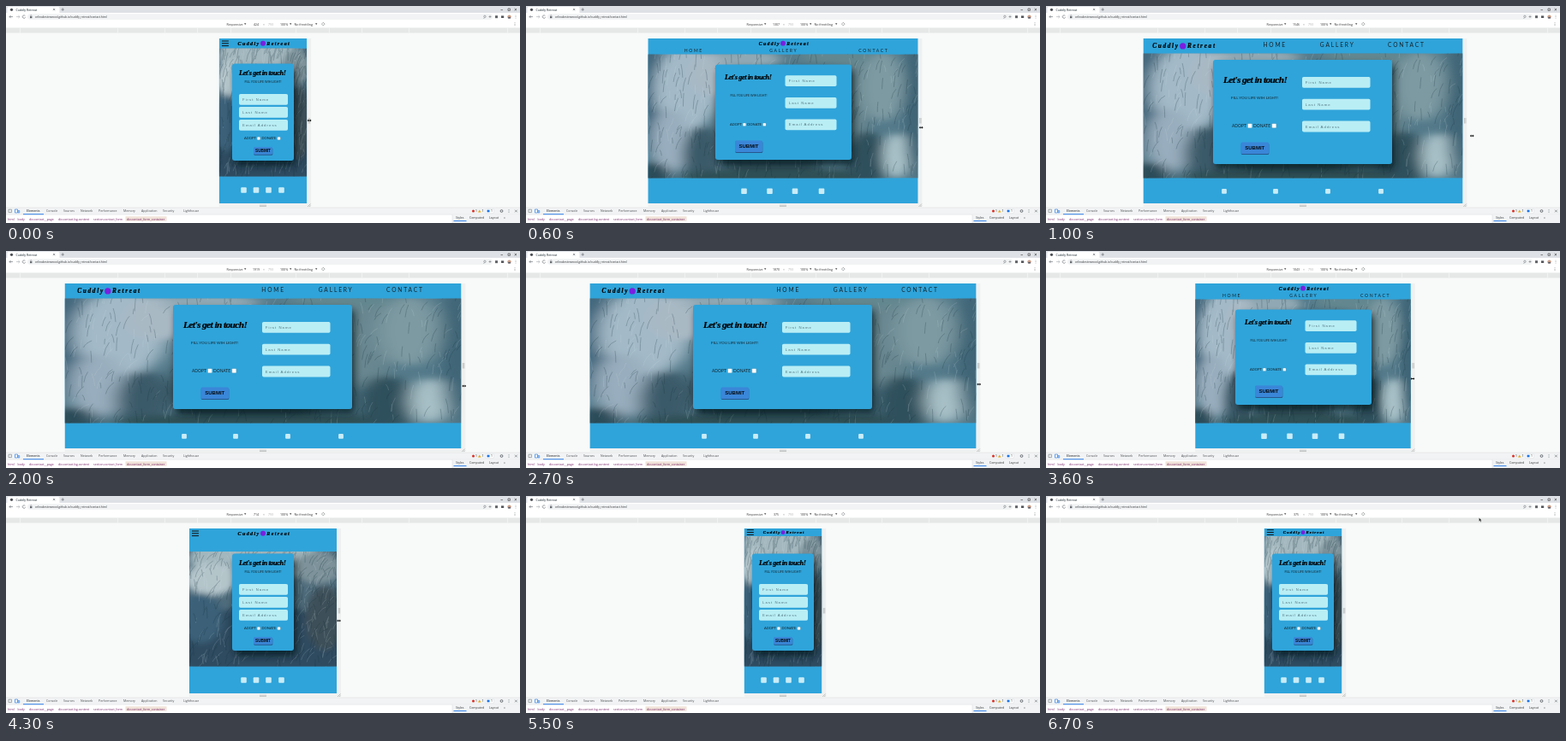
An HTML page for the animation above (7.4 s loop, 600x254 px).

```html
<!DOCTYPE html>
<html lang="en">
<head>
<meta charset="utf-8">
<title>Responsive contact page</title>
<style>
  html, body { margin: 0; width: 100%; height: 100%; overflow: hidden; background: #f8f9f9; }
  svg { display: block; }
  #stage { width: 100%; height: 100%; }
  text { white-space: pre; }
  .ui { font-family: "Open Sans", "Noto Sans", sans-serif; }
  .lato { font-family: Lato, sans-serif; }
  .arial { font-family: "Liberation Sans", Arial, sans-serif; }
  .script { font-family: "Liberation Serif", serif; font-weight: bold; font-style: italic; stroke: #000; stroke-width: .22px; }
  .fur path { vector-effect: non-scaling-stroke; }
</style>
</head>
<body>
<svg id="stage" viewBox="0 0 600 254">
  <defs>
    <filter id="soft" x="-20%" y="-20%" width="140%" height="140%"><feGaussianBlur stdDeviation="2.4"/></filter>
    <filter id="shade" x="-30%" y="-30%" width="160%" height="160%"><feGaussianBlur stdDeviation="4.5"/></filter>
  </defs>
  <g id="browser"></g>
  <g id="page"></g>
  <g id="pointer"></g>
</svg>
<script>
const LOOP = 7400, STEP = 100, SCALE = 0.241, MIDDLE = 300;
const TOP = 38, BOTTOM = 231;
const BLUE = '#2fa4da', INK = '#15232b';

// [ms, viewport width in CSS pixels]
const WIDTHS = [[0, 424], [100, 475], [400, 1010], [700, 1455], [800, 1525], [1000, 1546], [1500, 1919],
  [2000, 1919], [2200, 1958], [2500, 1958], [2700, 1870], [3100, 1369], [3300, 1236], [4100, 722],
  [4300, 714], [4400, 665], [4900, 378], [5000, 375]];
// [ms, distance from the right edge of the page, y]
const DRAG = [[0, 3, 134], [800, 4, 145], [1000, 11, 152], [1500, 3, 158], [2500, 4, 158],
  [3100, 2, 152], [4300, 2.5, 146], [5000, 3, 140]];
const LEAVE = [[4900, 348, 140], [5400, 541, 11]];
const RETURN = [[6500, 506.5, 17], [6700, 505.5, 25.5]];

function sample(keys, t, col = 1) {
  if (t <= keys[0][0]) return keys[0][col];
  const i = keys.findIndex(k => k[0] >= t);
  if (i < 0) return keys[keys.length - 1][col];
  const a = keys[i - 1], b = keys[i];
  return a[col] + (b[col] - a[col]) * (t - a[0]) / (b[0] - a[0]);
}

const rect = (x, y, w, h, fill, extra = '') =>
  `<rect x="${x}" y="${y}" width="${w}" height="${h}" fill="${fill}" ${extra}/>`;
const dot = (x, y, r, fill) => `<circle cx="${x}" cy="${y}" r="${r}" fill="${fill}"/>`;
const line = (d, color = '#5f6368', w = .6) =>
  `<path d="${d}" fill="none" stroke="${color}" stroke-width="${w}"/>`;
const text = (s, x, y, size, { cls = 'ui', fill = INK, anchor = 'start', gap = 0, bold = false } = {}) =>
  `<text class="${cls}" x="${x}" y="${y}" font-size="${size}" fill="${fill}" text-anchor="${anchor}"` +
  ` letter-spacing="${gap}"${bold ? ' font-weight="700"' : ''}>${s}</text>`;

function randomizer(seed) {
  return () => (seed = (seed * 16807) % 2147483647) / 2147483647;
}

// Soft colour fields with fine fur, in a 100 x 100 space; lean is the sideways reach of a hair
function photo(base, blobs, lean, seed) {
  const rnd = randomizer(seed);
  const fields = blobs.map(([x, y, rx, ry, c]) =>
    `<ellipse cx="${x}" cy="${y}" rx="${rx}" ry="${ry}" fill="${c}"/>`).join('');
  let light = '', dark = '';
  for (let i = 0; i < 420; i++) {
    const x = rnd() * 100, y = rnd() * 105, dx = (rnd() - .25) * lean, dy = -4 - rnd() * 8;
    const hair = `M${x.toFixed(1)} ${y.toFixed(1)}q${(dx * .2).toFixed(1)} ${(dy * .6).toFixed(1)} ${dx.toFixed(1)} ${dy.toFixed(1)}`;
    if (rnd() < .45) light += hair; else dark += hair;
  }
  return rect(0, 0, 100, 100, base) + `<g filter="url(#soft)">${fields}</g>` +
    `<g class="fur" opacity=".24">${line(light, '#d5e6ec', .7)}${line(dark, '#16323d', 1)}</g>`;
}

const WIDE_PHOTO = photo('#547a8a', [
  [1, 35, 5, 45, '#41657a'], [14, 28, 12, 34, '#a3b9c7'], [8, 70, 7, 26, '#98adbd'],
  [24, 16, 9, 18, '#a9b9c4'], [37, 4, 12, 8, '#90a8b3'], [20, 82, 7, 24, '#3b5a69'],
  [46, 72, 19, 36, '#31505a'], [50, 99, 38, 7, '#2f4f55'], [2, 97, 6, 10, '#2c4c58'],
  [76, 35, 7, 38, '#67868f'], [87, 26, 8, 28, '#7d9aa2'], [81, 84, 7, 22, '#2f505b'],
  [92, 82, 5, 18, '#a9c1c8'], [99, 40, 4, 60, '#3d6475'], [70, 2, 14, 6, '#64878f']], 3, 41);
const TALL_PHOTO = photo('#4f6c7c', [
  [45, 6, 45, 20, '#a3b7be'], [15, 24, 18, 14, '#b4c5ca'], [87, 14, 16, 14, '#7d929a'],
  [50, 82, 62, 34, '#2f4c61'], [8, 58, 14, 22, '#3a6178'], [92, 58, 13, 28, '#3d4f58']], 8, 97);

const LAYOUTS = {
  wide: {
    card: [195, 63, 209, 122], title: [207, 90.2, 11.3], motto: [243.5, 109.3, 4.55],
    check: [217, 142.4, 4.9, 235.5, 242, 263.8, 5], submit: [227.5, 159.5, 32.5, 13.5, 6],
    fields: [299, 79.5, 12.8, [83, 108.8, 134.6], 302.8], icons: [208, 268, 329, 391], icon: 5.8
  },
  medium: {
    card: [221, 68.5, 159, 111.5], title: [232, 86, 8.3], motto: [260, 106, 3.55],
    check: [238, 140.3, 4.05, 253.2, 258.3, 276.6, 3.5], submit: [244, 157.5, 32, 13.5, 6],
    fields: [302.5, 60, 12.8, [81.3, 106.9, 132.5], 306.8], icons: [254.5, 284.5, 314, 345], icon: 6.6
  },
  narrow: {
    card: [264, 67.5, 72, 113.5], title: [272, 81, 8.3], motto: [300, 90.3, 3.55],
    check: [278, 156.4, 4.05, 293.2, 298.5, 316.8, 3.5], submit: [289, 165, 22, 8.8, 4.7],
    fields: [272, 57, 12.8, [103, 118, 133], 276], icons: [277.5, 292, 306.5, 321.5], icon: 6.6
  }
};

function logo(x, y, size) {
  const style = { cls: 'script', gap: size * .235, fill: '#000' };
  return text('Cuddly', x - size * .55, y, size, { ...style, anchor: 'end' }) +
    dot(x, y - size * .33, size * .5, '#7a1fe0') +
    text('Retreat', x + size * .72, y, size, style);
}

function form(l) {
  const [cx, cy, cw, ch] = l.card, [sx, sy, sw, sh, ss] = l.submit;
  const [fx, fw, fh, rows, labelX] = l.fields;
  const [ax, ay, as, box1, dx, box2, box] = l.check;
  const tick = x => rect(x, ay - box + .3, box, box, '#fff', 'rx=".7" stroke="#6b8791" stroke-width=".3"');
  const labels = ['First Name', 'Last Name', 'Email Address'];
  return rect(cx + 3, cy + 6, cw, ch, '#06141c', 'rx="4" filter="url(#shade)" opacity=".75"') +
    rect(cx, cy, cw, ch, BLUE, 'rx="3"') +
    text("Let's get in touch!", l.title[0], l.title[1], l.title[2],
      { cls: 'script', gap: -.05 * l.title[2], fill: '#000' }) +
    text('FILL YOU LIFE WIH LIGHT!', ...l.motto, { cls: 'lato', anchor: 'middle' }) +
    rows.map((y, i) => rect(fx, y, fw, fh, '#b9eef5', 'rx="1.8"') +
      text(labels[i], labelX, y + 7.9, 4.3, { cls: 'arial', gap: 1.02, fill: '#52747f' })).join('') +
    text('ADOPT', ax, ay, as, { cls: 'lato' }) + tick(box1) +
    text('DONATE', dx, ay, as, { cls: 'lato' }) + tick(box2) +
    rect(sx + .3, sy + 1, sw, sh, '#27588f', 'rx="1.5"') +
    rect(sx, sy, sw, sh, '#3a86d8', 'rx="1.5"') +
    text('SUBMIT', sx + sw / 2, sy + sh / 2 + ss * .36, ss, { cls: 'arial', anchor: 'middle', bold: true, fill: '#060c14' });
}

function header(mode, left, right, width) {
  const nav = (s, x, y, size, gap) =>
    text(s, x + gap / 2, y, size, { cls: 'lato', anchor: 'middle', gap });
  if (mode === 'wide') {
    const inset = 46 + (width - 372.5) * .045;
    return logo(left + inset, 49.3, 7.25) + nav('HOME', right - 220, 48.4, 6.6, 1.85) +
      nav('GALLERY', right - 147, 48.4, 6.6, 1.85) + nav('CONTACT', right - 66.3, 48.4, 6.6, 1.85);
  }
  if (mode === 'medium') {
    return logo(MIDDLE, 45.6, 5.75) + ['HOME', 'GALLERY', 'CONTACT']
      .map((s, i) => nav(s, left + width * (2 * i + 1) / 6, 54, 5.1, 1.65)).join('');
  }
  const small = width < 96, y = small ? 39.7 : 41;
  return [0, 2.8, 5.6].map(d => rect(left + 3, y + d - .5, 8, 1, '#111')).join('') +
    logo(MIDDLE, small ? 44.3 : 45.8, small ? 4.75 : 6);
}

function page(cssWidth) {
  const mode = cssWidth > 1400 ? 'wide' : cssWidth > 768 ? 'medium' : 'narrow';
  const l = LAYOUTS[mode], tall = mode === 'narrow';
  const width = cssWidth * SCALE, left = MIDDLE - width / 2, right = MIDDLE + width / 2;
  const photoTop = tall ? 47 + Math.max(0, width - 90.4) * .22 : mode === 'wide' ? 55.5 : 56.5;
  const photoEnd = tall ? 199.5 : 201.5;
  const grip = right + 2.9;
  return rect(left, TOP, width + 5, BOTTOM - TOP + 5, '#eff1f1') +
    rect(left, TOP, width, BOTTOM - TOP, BLUE) +
    `<svg x="${left}" y="${photoTop}" width="${width}" height="${photoEnd - photoTop}" viewBox="0 0 100 100" preserveAspectRatio="none">${tall ? TALL_PHOTO : WIDE_PHOTO}</svg>` +
    header(mode, left, right, width) + form(l) +
    l.icons.map(x => rect(x - l.icon / 2, 216.5 - l.icon / 2 + (tall ? -1 : .3), l.icon, l.icon, '#c9ecf7', 'rx="1"')).join('') +
    line(`M${grip - .7} 131v6.5m1.4 -6.5v6.5M296 233.2h8m-8 1.3h8`, '#999', .5) +
    line(`M${right + 1} 235l3.5 -3.5m-1.5 3.5l1.5 -1.5`, '#888', .5) +
    text(Math.round(cssWidth), 292, 22.6, 3.6, { anchor: 'middle', fill: '#333' });
}

function pointer(t, cssWidth) {
  const arrow = (x, y) =>
    `<path transform="translate(${x} ${y})" d="M0 0v4.2l1-.9.7 1.6.8-.4-.7-1.5h1.3z" fill="#111" stroke="#fff" stroke-width=".25"/>`;
  if (t < 5000) {
    const x = MIDDLE + cssWidth * SCALE / 2 + sample(DRAG, t), y = sample(DRAG, t, 2);
    return `<path transform="translate(${x} ${y})" d="M-2.4 0l1.5-1.4v.9h1.8v-.9l1.5 1.4-1.5 1.4v-.9h-1.8v.9z" fill="#111"/>`;
  }
  if (t < 5500) return arrow(sample(LEAVE, t), sample(LEAVE, t, 2));
  return t < 6500 ? '' : arrow(sample(RETURN, t), sample(RETURN, t, 2));
}

function browser() {
  const grey = '#5f6368';
  const many = (items, y, size, style) => items.map(([s, x]) => text(s, x, y, size, style)).join('');
  const arrowDown = x => `<path d="M${x} 20.3h2.4l-1.2 1.8z" fill="#444"/>`;
  const dots = (x, y) => [-1.5, 0, 1.5].map(d => dot(x, y + d, .45, grey)).join('');
  const tabBar = rect(0, 0, 600, 8, '#dee1e6') + rect(1.5, 1, 61, 8, '#fff', 'rx="1.8"') +
    dot(6.5, 4.3, 1.6, '#4b4f54') + text('Cuddly Retreat', 11.5, 5.6, 3.6) +
    line('M55 3l2.2 2.2m0 -2.2l-2.2 2.2M64.5 4.1h3.4m-1.7 -1.7v3.4') +
    line('M577.5 4.6h2.4M586 3h2.4v2.4h-2.4zM593.6 3l2.4 2.4m0 -2.4l-2.4 2.4', '#333');
  const toolbar = rect(0, 8, 600, 9, '#fff') + rect(25, 9.2, 543, 6.8, '#f1f3f4', 'rx="3.4"') +
    line('M8 12.6h-4m1.6 -1.6l-1.6 1.6l1.6 1.6') + line('M12 12.6h4m-1.6 -1.6l1.6 1.6l-1.6 1.6', '#a5a8ab') +
    line('M22.4 11.6a1.7 1.7 0 1 0 .2 1.6') + rect(28, 12.2, 2.4, 2, grey) + line('M28.5 12.3v-1a.7 .7 0 0 1 1.4 0v1', grey, .4) +
    text('orlinakesterwood.github.io/cuddly_retreat/contact.html', 34, 13.9, 3.25, { fill: '#303236' }) +
    line('M558.5 13.8l-1 1m2.6 -2.5a1.2 1.2 0 1 1 -2.4 0a1.2 1.2 0 0 1 2.4 0M565 11v3m-1.5 -1.5h3', grey, .5) +
    rect(571, 11.2, 3, 3, grey) + rect(578, 11.4, 3.2, 2.6, '#55585c') +
    dot(587.5, 12.6, 2.2, '#c9a08b') + rect(585.9, 13.1, 3.2, 1.5, '#59616d', 'rx=".7"') + dots(595, 12.6);
  const device = rect(0, 17, 600, 8.5, '#fff') + text('Responsive', 257.5, 22.6, 3.6, { fill: '#333' }) + arrowDown(278) +
    text('×', 300, 22.6, 3.4, { fill: '#888' }) + text('793', 306, 22.6, 3.4, { fill: '#aaa' }) +
    text('100%', 320, 22.6, 3.6, { fill: '#333' }) + arrowDown(331) +
    text('No throttling', 336.5, 22.6, 3.6, { fill: '#333' }) + arrowDown(361) +
    rect(369, 19.8, 2.6, 2.6, 'none', `stroke="${grey}" stroke-width=".5" transform="rotate(45 370.3 21.1)"`) + dots(594, 21.2);
  const ruler = rect(0, 25.5, 600, 6, '#e6e8e8') +
    [16, 130, 185, 223, 262, 338, 377, 415, 470, 585].map(x => rect(x, 25.5, .6, 6, '#f7f8f8')).join('');
  const tabs = [['Console', 47], ['Sources', 67], ['Network', 87], ['Performance', 108],
    ['Memory', 137], ['Application', 158], ['Security', 183], ['Lighthouse', 207]];
  const crumbs = [['html', 2], ['body', 13.5], ['div.contact__page', 27], ['div.contact.bg-content', 61],
    ['section.contact_form', 102], ['div.contact_form_container', 141]];
  const tools = rect(0, 236, 600, 8, '#f1f3f4') + rect(0, 244, 600, 10, '#fff') +
    line('M0 236h600M0 244.2h600', '#cfd2d6', .4) +
    line('M3 238.2h3.4v3.4h-3.4z', grey, .5) + line('M10.5 238h3v4h-3zM14.2 239.5h1.5v2.5h-1.5z', '#1a73e8', .6) +
    text('Elements', 24, 241.4, 3.6, { fill: '#111' }) + rect(20, 243.3, 24, .9, '#1a73e8') +
    many(tabs, 241.4, 3.55, { fill: '#4a4d51' }) +
    dot(545.5, 240, 1.5, '#d93025') + text('1', 548, 241.3, 3.4) +
    '<path d="M551 241.4l1.7-3 1.7 3z" fill="#f2a600"/>' + text('1', 555.5, 241.3, 3.4) +
    rect(559.5, 237.8, 10, 4.6, '#fff', 'stroke="#c8ccd0" stroke-width=".3" rx=".6"') +
    rect(561.5, 238.7, 3, 2.6, '#1a73e8') + text('1', 566, 241.3, 3.4) +
    `<circle cx="578.5" cy="240" r="1.4" fill="none" stroke="${grey}" stroke-width=".9"/>` + dots(587, 240) +
    line('M594 238.6l2.8 2.8m0 -2.8l-2.8 2.8') +
    rect(139.5, 246.3, 48, 5.4, '#f0e2d8') + many(crumbs, 250.6, 3.5, { fill: '#7c2a6d' }) +
    rect(521, 244.3, 79, 9.7, '#f1f3f4') + line('M521 244.2v9.8', '#cfd2d6', .4) +
    many([['Styles', 525], ['Computed', 541], ['Layout', 564], ['»', 581]], 249.4, 3.5, { fill: '#333' }) +
    rect(522.5, 251.2, 15, .9, '#1a73e8');
  return tabBar + toolbar + device + ruler + tools;
}

const layer = id => document.getElementById(id);
layer('browser').innerHTML = browser();
let shown = -1;
const start = performance.now();

function draw(now) {
  const t = Math.floor((Math.max(0, now - start) % LOOP) / STEP) * STEP;
  if (t !== shown) {
    const width = sample(WIDTHS, t);
    layer('page').innerHTML = page(width);
    layer('pointer').innerHTML = pointer(t, width);
    shown = t;
  }
  requestAnimationFrame(draw);
}
draw(start);
</script>
</body>
</html>
```
